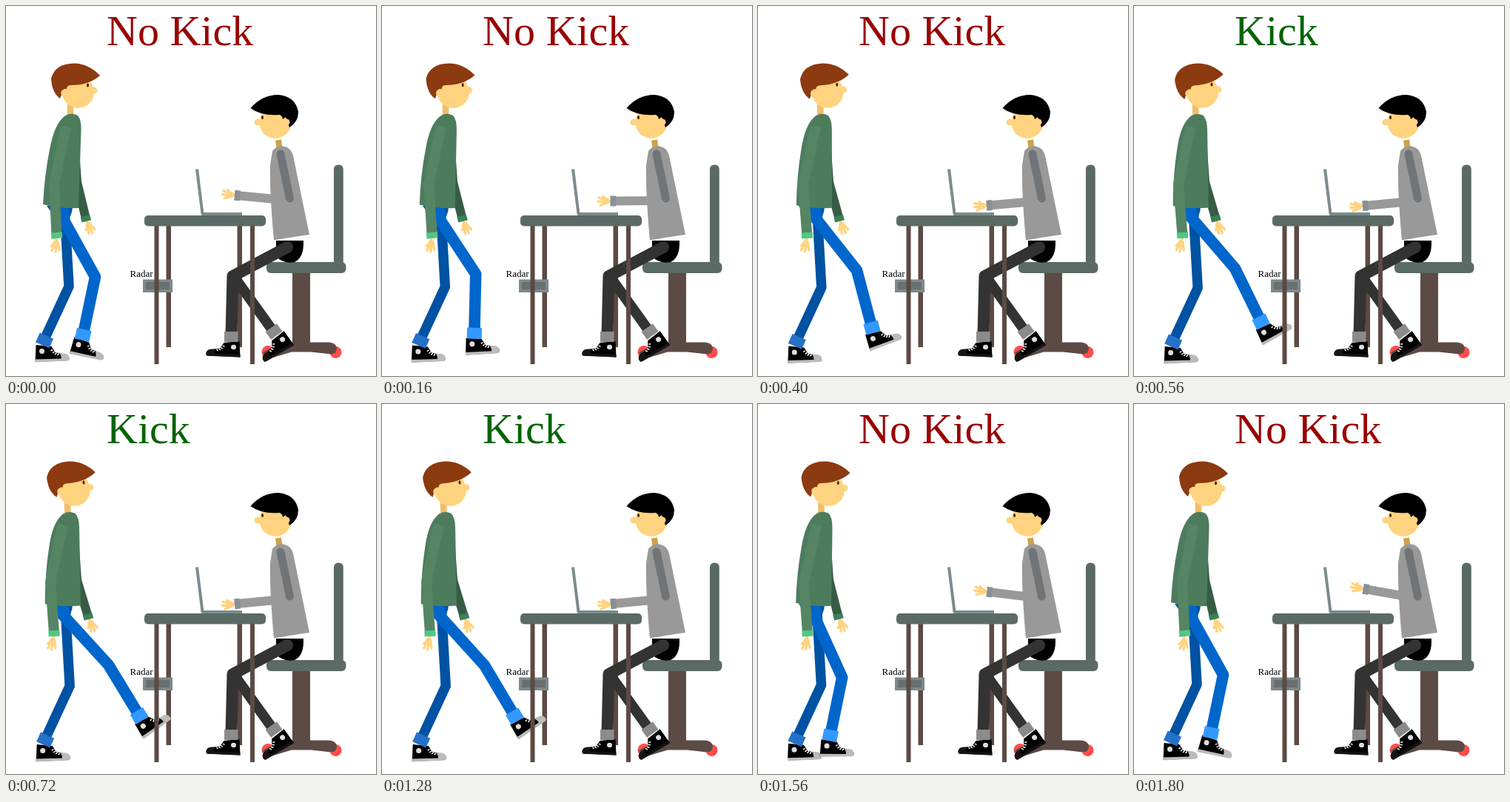
Animation, 500 px wide and 500 px high, one loop 1.84 s. Source, as an HTML page:

```html
<!DOCTYPE html>
<html lang="en">
<head>
<meta charset="utf-8">
<title>Kick radar</title>
<style>
  html, body { margin: 0; width: 100%; height: 100%; overflow: hidden; background: #fff; }
  svg { display: block; width: 100vw; height: 100vh; }
  text { font-family: "Liberation Serif", "Times New Roman", serif; }
  .limb { fill: none; stroke-linejoin: round; }
  .skin { fill: #ffd37f; }
  .wood { fill: #5c4a44; }
  .metal { fill: #5a6a64; }
  .sole { fill: var(--sole, #bbb); }
  .dark { --sole: #151515; }
</style>
</head>
<body>
<svg viewBox="0 0 500 500">
  <defs>
    <!-- Origin at the middle of the collar, toe to the right -->
    <g id="shoe">
      <path d="M-11-1L10 1L15 9L25 11Q34 11 34 18L32 20L-12 22Z" fill="#000"/>
      <path class="sole" d="M21 10.500Q33 9 34 16L33 20L23 20Q24 14 21 10.500Z"/>
      <path class="sole" d="M-12 18.500L24 17.500L34 16.500Q35 20 31 20.500L-12 22.500Z"/>
      <circle cx="-3" cy="7.500" r="3.500" fill="#ddd"/>
      <path d="M9 7l2.500-1.500M11.500 10l2.500-2M14.500 12l2.500-2.500M18 13l2-2.500" stroke="#fff" stroke-width="1.500"/>
    </g>
    <!-- Origin at the wrist, fingers down, thumb to the left -->
    <g id="hand" class="skin" stroke="#ffd37f" stroke-linecap="round">
      <ellipse cy="7" rx="4.500" ry="5" stroke="none"/>
      <path d="M0 0V7M-2 7L-6 11M-2 9L-4.500 17M1 9L.5 18M3 8L5.500 15" fill="none" stroke-width="3.300"/>
    </g>
  </defs>

  <text id="title" x="136" y="53" font-size="58"></text>

  <!-- Rear table legs and chair -->
  <path class="wood" d="M216.500 296h6.500v165h-6.500zM312.500 296h6.500v165h-6.500z"/>
  <circle cx="354" cy="467.500" r="8.500" fill="#ff4d4d"/>
  <circle cx="445.500" cy="468" r="8" fill="#ff4d4d"/>
  <path class="wood" d="M387 358h24v96.500h26q10 1 10 9q-1 7-8 7l-27-3h-26l-33 10l-6-9q12-9 40-14z"/>
  <rect class="metal" x="443" y="214.500" width="12.800" height="145" rx="6"/>
  <rect class="metal" x="352" y="346" width="107.500" height="15" rx="6"/>

  <!-- Seated man -->
  <path d="M365 317H402Q403 340 390 346Q374 349 365 338Z" fill="#000"/>
  <g class="limb" stroke="#333">
    <path d="M309 367L360 438" stroke-width="14"/>
    <path d="M380 326L306.500 365L304.500 444" stroke-width="16"/>
    <circle cx="380" cy="326" r="8" fill="#333" stroke="none"/>
  </g>
  <g class="dark">
    <use href="#shoe" transform="translate(304.500 454) scale(-1 .92)"/>
    <use href="#shoe" transform="translate(367 446) rotate(-33) scale(-1 1)"/>
  </g>
  <rect x="295" y="440" width="18.500" height="14" fill="#8b8b8b"/>
  <rect x="-9.500" y="-6.500" width="19" height="13" fill="#8b8b8b" transform="translate(362 440) rotate(-36)"/>
  <path d="M368 181L369.500 192" stroke="#cda349" stroke-width="8"/>
  <circle class="skin" cx="364" cy="157.500" r="21.500"/>
  <circle class="skin" cx="340" cy="157" r="4.500"/>
  <ellipse cx="346.500" cy="150.500" rx="1.500" ry="2.500" fill="#42210b"/>
  <path d="M330.500 138Q346 120 368 120Q391 122 395 143Q395 157 383 164L378 150L374 153Q374 149 370 147Q345 149 330.500 138Z" fill="#000"/>
  <circle class="skin" cx="379" cy="157" r="4.500"/>
  <path d="M360 196Q366 188 375 189.500Q385 191 388 202L410 309Q388 312 362 316.500Q356 250 357 215Z" fill="#999"/>

  <!-- Laptop -->
  <path d="M258 220.500L265.500 281H319" class="limb" stroke="#7b8c8e" stroke-width="4"/>

  <!-- Walker -->
  <g id="backLeg">
    <path class="limb" d="M79 274L85 379L53 448" stroke="#0052a3" stroke-width="13.500"/>
    <use href="#shoe" transform="translate(51.500 459)"/>
    <rect x="-10" y="-7" width="20" height="14" fill="#2671c8" transform="translate(52 452) rotate(24)"/>
  </g>
  <path d="M55 270H90Q90 284 80 292L68 288Z" fill="#0052a3"/>
  <circle cx="76" cy="280" r="10" fill="#06c"/>
  <path id="frontLimb" class="limb" stroke="#06c" stroke-width="15.500"/>
  <use id="frontShoe" href="#shoe"/>
  <rect id="frontCuff" x="-10" y="-7.500" width="20" height="15" fill="#39f"/>
  <path id="farArm" class="limb" stroke="#375c45" stroke-width="12"/>
  <g id="farHand">
    <use href="#hand" y="3" transform="rotate(-8)"/>
    <rect x="-6.500" y="-4" width="13" height="7.500" fill="#3a8057"/>
  </g>
  <g id="body">
    <path d="M87 133V150" stroke="#f2bd67" stroke-width="8.500"/>
    <circle class="skin" cx="97.500" cy="116.500" r="21.500"/>
    <circle class="skin" cx="119" cy="114" r="4.500"/>
    <ellipse cx="110.500" cy="107" rx="1.500" ry="2.500" fill="#42210b"/>
    <path d="M127 94Q112 78 92 77.500Q66 78 61 98Q62 117 73 125L78 112L82 112Q82 107 88 107Q112 107 127 94Z" fill="#8c3a10"/>
    <circle class="skin" cx="79" cy="117.500" r="4.800"/>
    <path d="M79 149Q87 143 97 148Q102 154 101.500 168L98 273Q72 274 50 268Q52 228 59 194Q65 160 79 149Z" fill="#4d7c5d"/>
  </g>
  <path id="nearArm" class="limb" stroke="#558563" stroke-width="14"/>
  <g id="nearHand">
    <use href="#hand" y="4" transform="rotate(5)"/>
    <rect x="-7.500" y="-4" width="15" height="8" fill="#52c785" transform="rotate(-7)"/>
  </g>

  <!-- Radar and table front -->
  <rect x="185" y="369.500" width="40" height="17.500" fill="#7d898a"/>
  <rect x="189" y="373" width="32" height="10" fill="#696e70"/>
  <path class="wood" d="M200.500 296h6v188h-6zM330 296h6v188h-6z"/>
  <rect class="metal" x="187" y="283" width="164" height="14.500" rx="5"/>
  <text x="167.500" y="366" font-size="13">Radar</text>

  <!-- Typing arm -->
  <g id="typingArm">
    <use href="#hand" transform="translate(310 263) rotate(90)"/>
    <path d="M314 257L385 257V269L314 269Z" fill="#999"/>
    <rect x="308.500" y="256" width="7.500" height="14" fill="#889094"/>
  </g>
  <path d="M371 200L383.500 260" stroke="#707477" stroke-width="11" stroke-linecap="round"/>
</svg>
<script>
const LOOP = 1840, STEP = 40, THIGH = 96, SHIN = 80;
const HIP = { x: 74, y: 282 };

// time, body lean, thigh, shin, foot, typing arm (degrees), near elbow x, near wrist x, far wrist x
const poses = [
  [0,    0,    29,   -11.8, 14,  5.5,  65,   68.5, 108],
  [280,  -1.3, 36.5, 6.5,   -12, -4.7, 62,   67,   109],
  [560,  -2.9, 40.7, 26,    -27, -5.5, 60,   65.5, 110.5],
  [720,  -2.9, 42.4, 31.2,  -33, -5.5, 60,   65,   111],
  [1240, -2.9, 42.4, 31.2,  -33, -5.5, 60,   65,   111],
  [1280, -2.9, 42.2, 30.7,  -32, -5.5, 60,   65,   111],
  [1560, -1.2, 24.4, -11.5, 2,   7,    62,   67,   108.5],
  [1800, 0,    29,   -11.8, 14,  10,   65,   68.5, 108]
];

const $ = id => document.getElementById(id);
const set = (id, name, value) => $(id).setAttribute(name, value);
const place = (id, p, angle) => set(id, "transform", `translate(${p.x} ${p.y}) rotate(${angle})`);
const reach = (from, length, degrees) => {
  const a = degrees * Math.PI / 180;
  return { x: from.x + length * Math.sin(a), y: from.y + length * Math.cos(a) };
};
const line = (...points) => "M" + points.map(p => `${p.x} ${p.y}`).join("L");

function poseAt(t) {
  const next = poses.findIndex(p => p[0] > t);
  if (next < 0) return poses[poses.length - 1];
  const a = poses[next - 1], b = poses[next];
  const k = (t - a[0]) / (b[0] - a[0]);
  return a.map((v, i) => v + (b[i] - v) * k);
}

function draw(t) {
  const [, lean, thigh, shin, foot, typing, elbowX, nearX, farX] = poseAt(t);
  const knee = reach(HIP, THIGH, thigh);
  const cuff = reach(knee, SHIN, shin);

  set("frontLimb", "d", line(HIP, knee, cuff));
  place("frontCuff", cuff, -shin);
  place("frontShoe", reach(knee, SHIN + 7, shin), foot);
  set("backLeg", "transform", `translate(${-lean * .4} ${-lean * .7})`);

  set("body", "transform", `rotate(${lean} 90 216)`);
  const near = { x: nearX, y: 310 }, far = { x: farX, y: 287.5 };
  set("nearArm", "d", line({ x: 81 + lean * 1.5, y: 163 }, { x: elbowX, y: 241 }, near));
  place("nearHand", near, -lean * 2);
  set("farArm", "d", line({ x: 92, y: 180 }, { x: 96, y: 238 }, far));
  place("farHand", far, -15);
  set("typingArm", "transform", `rotate(${typing} 385 263)`);

  const kick = t >= 440 && t < 1400;
  $("title").textContent = kick ? "Kick" : "No Kick";
  set("title", "fill", kick ? "#006400" : "#900");
}

const start = performance.now();
function tick() {
  const t = (performance.now() - start) % LOOP;
  draw(Math.floor(t / STEP) * STEP);
  requestAnimationFrame(tick);
}
tick();
</script>
</body>
</html>
```
